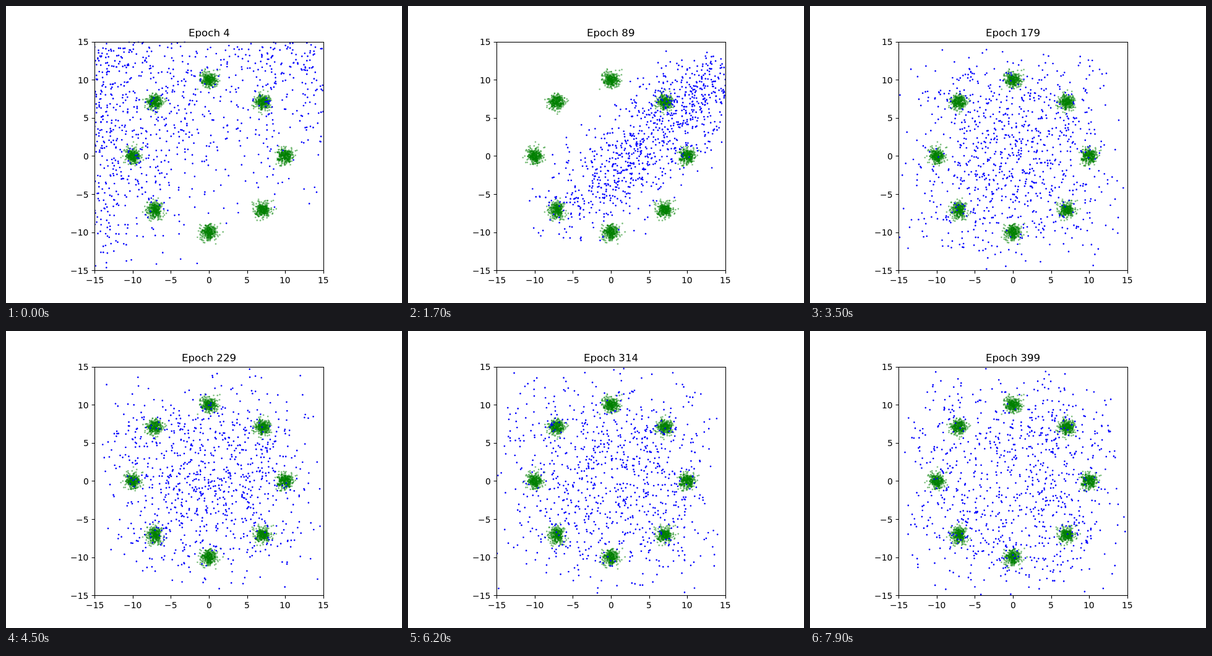
An HTML page that plays this animation: 640x480 px, repeating every 8 s.

```html
<!DOCTYPE html>
<html lang="en">
<head>
<meta charset="utf-8">
<title>Epochs</title>
<style>
  html, body { margin: 0; width: 100%; height: 100%; overflow: hidden; background: #fff; }
  svg { display: block; width: 640px; height: 480px; }
  text { font-family: "DejaVu Sans", sans-serif; font-size: 13.89px; fill: #000; }
  #title { font-size: 16.67px; }
</style>
</head>
<body>
<svg viewBox="0 0 640 480">
  <clipPath id="box"><rect x="143.2" y="57.6" width="369.6" height="369.6"/></clipPath>
  <g clip-path="url(#box)">
    <g id="real" fill="#008000" fill-opacity=".5"></g>
    <path id="fake" fill="none" stroke="#00f" stroke-width="2.7" stroke-linecap="round"/>
  </g>
  <g id="axes" fill="none" stroke="#000" stroke-width="1.1">
    <rect x="143.5" y="58.5" width="370" height="369"/>
  </g>
  <g id="labels"></g>
  <text id="title" y="49"></text>
</svg>
<script>
const LOOP = 8000, STEP = 100, SAMPLES = 900, PER_CLUSTER = 350, LIMIT = 15;
const $ = id => document.getElementById(id);
const px = x => 328 + 12.32 * x;
const py = y => 242.4 - 12.32 * y;
const clamp01 = v => Math.min(1, Math.max(0, v));
const mix = (a, b, u) => a + (b - a) * u;
const logistic = v => 1 / (1 + Math.exp(-v));

function add(parent, tag, attrs = {}) {
  const node = document.createElementNS("http://www.w3.org/2000/svg", tag);
  for (const key in attrs) node.setAttribute(key, attrs[key]);
  return parent.appendChild(node);
}

// Sets text on whole pixels; align is 0.5 for centred, 1 for right-aligned
function setText(node, text, x, align) {
  node.textContent = text;
  node.setAttribute("x", Math.round(x - align * node.getComputedTextLength()));
}

function randomFrom(seed) {
  let a = seed * 7919 + 12345;
  return () => {
    a = (a + 0x6D2B79F5) | 0;
    let t = Math.imul(a ^ (a >>> 15), 1 | a);
    t = (t + Math.imul(t ^ (t >>> 7), 61 | t)) ^ t;
    return ((t ^ (t >>> 14)) >>> 0) / 4294967296;
  };
}

// Three shapes of the generated cloud: a hook along the left and top,
// a diagonal band, and a soft square whose middle can be full or hollow
const hook = (x, y) => logistic((y - .6 * x + 2) / 3.5) * (.35 + .65 * (x / 14) ** 2);
const band = (x, y) => Math.exp(-(((x - y - 3) / 6.2) ** 2) - (y / 12.5) ** 8) * logistic((x + y + 10) / 4);
const disc = (x, y, core) =>
  Math.exp(-((x / 11.5) ** 4) - (y / 11.5) ** 4) * (1 + core * Math.exp(-(x * x + y * y) / 35));

function density(x, y, time) {
  const toBand = clamp01(time / 1700);
  const toDisc = clamp01((time - 1700) / 900);
  const core = mix(.9, -.6, clamp01((time - 4500) / 3400));
  return mix(mix(hook(x, y), band(x, y), toBand), disc(x, y, core), toDisc);
}

function samplePoint(time, rand) {
  for (;;) {
    const x = LIMIT * (2 * rand() - 1), y = LIMIT * (2 * rand() - 1);
    if (2 * rand() < density(x, y, time)) return [x, y];
  }
}

function drawAxes() {
  const snap = v => Math.round(v) + .5;
  for (let v = -LIMIT; v <= LIMIT; v += 5) {
    const label = String(v).replace("-", "\u2212");
    add($("axes"), "path", { d: `M${snap(px(v))} 427.5v4.9M143.5 ${snap(py(v))}h-4.9` });
    setText(add($("labels"), "text", { y: 448 }), label, px(v), .5);
    setText(add($("labels"), "text", { y: Math.round(py(v) + 5.6) }), label, 133.5, 1);
  }
}

function drawClusters() {
  const rand = randomFrom(5);
  for (let k = 0; k < 8; k++) {
    const angle = k * Math.PI / 4;
    for (let i = 0; i < PER_CLUSTER; i++) {
      const r = .5 * Math.sqrt(-2 * Math.log(1 - rand())), a = 2 * Math.PI * rand();
      add($("real"), "circle", {
        cx: px(10 * Math.cos(angle) + r * Math.cos(a)).toFixed(2),
        cy: py(10 * Math.sin(angle) + r * Math.sin(a)).toFixed(2),
        r: 1.35
      });
    }
  }
}

function drawStep(step) {
  const rand = randomFrom(step + 100);
  let d = "";
  for (let i = 0; i < SAMPLES; i++) {
    const [x, y] = samplePoint(step * STEP, rand);
    d += `M${px(x).toFixed(1)} ${py(y).toFixed(1)}h0`;
  }
  $("fake").setAttribute("d", d);
  setText($("title"), `Epoch ${4 + 5 * step}`, 328, .5);
}

drawAxes();
drawClusters();

const start = performance.now();
let shown = -1;
function tick() {
  const step = Math.floor(((performance.now() - start) % LOOP) / STEP);
  if (step !== shown) drawStep(shown = step);
  requestAnimationFrame(tick);
}
tick();
</script>
</body>
</html>
```
